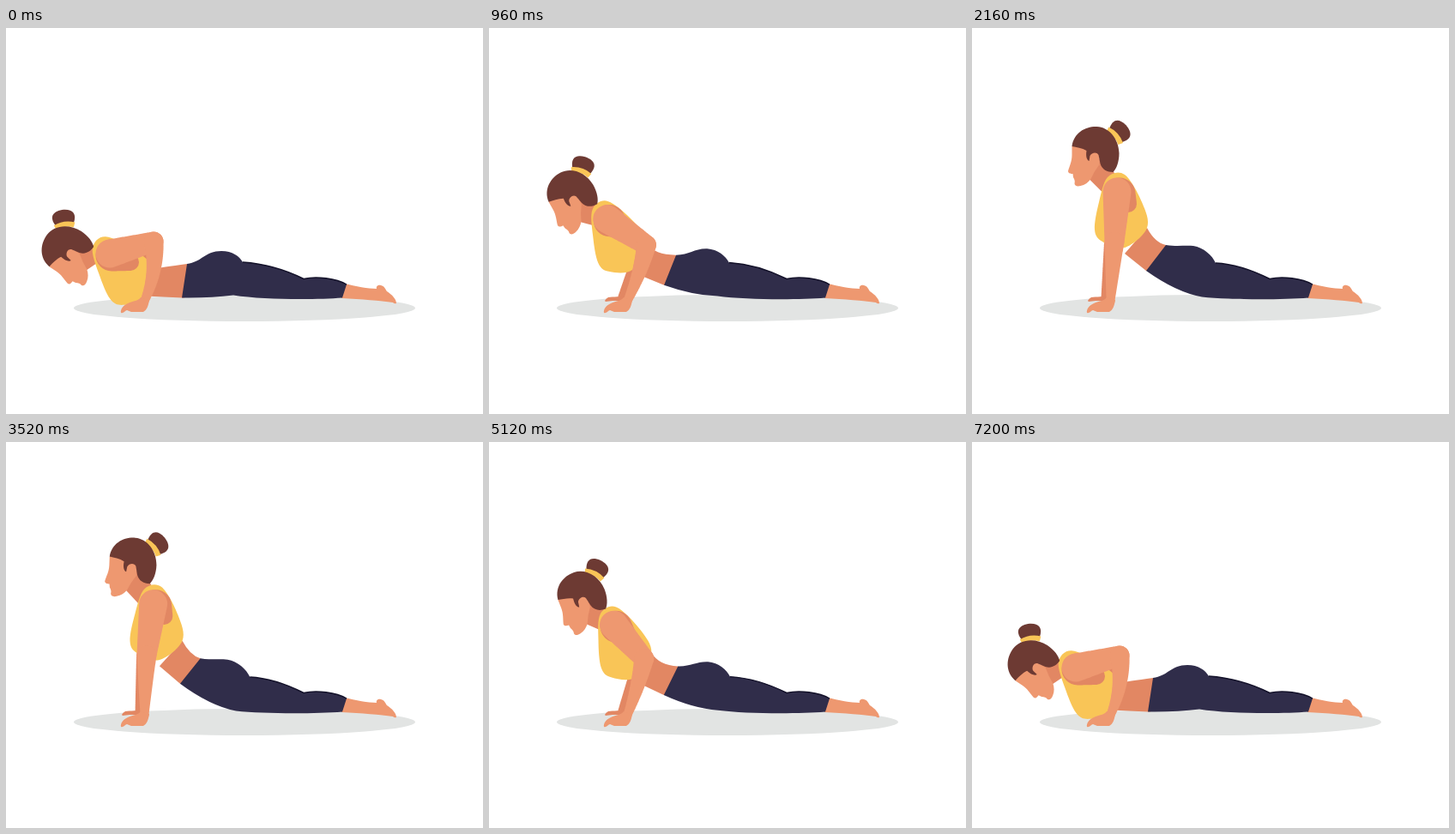
Animation, 556 px wide and 450 px high, one loop 7.24 s. Source, as an HTML page with a canvas:

```html
<!DOCTYPE html>
<html lang="en">
<head>
<meta charset="utf-8">
<title>Cobra stretch</title>
<style>
  html, body { margin: 0; width: 100%; height: 100%; overflow: hidden; background: #fff; }
  canvas { display: block; width: 556px; height: 450px; }
</style>
</head>
<body>
<canvas id="stage"></canvas>
<script>
const LOOP = 7240, STEP = 40, PEAK = 1.03;
const SKIN = '#ee9870', SHADE = '#e28763', HAIR = '#6d3a33', YELLOW = '#f9c557',
      NAVY = '#302d4a', EDGE = '#131129', FLOOR = '#e2e4e3';

// Outline of the top around the shoulder, upright: strap, chest, bust, hem, back, nape.
const TOP = [[-14, -19], [-24, 10], [-29, 42], [-20, 56], [6, 63], [32, 40], [26, 10], [6, -22]];

// Head parts, upright around (0, 0); the bun sits on its own tilted axis.
const face = new Path2D('M-29 -7L-29 3C-29 11 -32 16 -33.5 22C-33 25 -30 25 -28 25L-27.5 29Q-25 33 -26 36C-26 39 -23 40 -19 39C-14 38 -10 35 -7 31L-3 23L3 14V-5L-16 -15Z');
const hair = new Path2D('M-29 -7C-27 -23 -13 -30.5 0 -30C14 -29.5 25.5 -16 26 1C26 11 23 19 19 23C12 23 6 20 4 13L2 3C0 -1 -6 0 -8 4L-9 10C-12 9 -13 4 -12 -2C-17 -5 -24 -6 -29 -7Z');
const bun = new Path2D('M-10 -29C-16 -40 -12 -46 0 -46.5C12 -46 17 -40 11 -29Z');
const foot = new Path2D('M394 298C408 301 422 304 432 304C431 301 434 299 437 300C441 301 442 304 444 307C450 311 455 316 455 321Q453 322 451 320C436 318 415 316 391 315Z');
const nearHand = new Path2D('M157 314C155 318 148 318 142 321C137 323 133 328 134 332C137 333 138 330 141 329L146 331H160C164 329 166 324 167 317Z');
const farHand = new Path2D('M159 311C154 314 145 313 139 314C136 316 134 318 136 319L144 318H158Z');

const canvas = document.getElementById('stage');
const ctx = canvas.getContext('2d');
const ratio = window.devicePixelRatio || 1;
canvas.width = 556 * ratio;
canvas.height = 450 * ratio;

const rad = deg => deg * Math.PI / 180;
const mix = (a, b, k) => a + (b - a) * k;
const mixPt = (a, b, k) => [mix(a[0], b[0], k), mix(a[1], b[1], k)];
const progress = (t, from, length) => Math.min(1, Math.max(0, (t - from) / length));
const wave = k => (1 - Math.cos(Math.PI * k)) / 2;

// 0 lies on the mat, 1 is raised; a small extra stretch follows before sinking.
function liftAt(t) {
  const rise = 1 - Math.pow(1 - progress(t, 0, 2160), 1.4);
  const stretch = (PEAK - 1) * wave(progress(t, 2340, 900));
  return (rise + stretch) * (1 - wave(progress(t, 3960, 2980)));
}

// Maps points given around a pivot into the stage.
function frame(pivot, angle) {
  const c = Math.cos(angle), s = Math.sin(angle);
  return ([x, y]) => [pivot[0] + x * c - y * s, pivot[1] + x * s + y * c];
}

function fill(color, path) {
  ctx.fillStyle = color;
  path ? ctx.fill(path) : ctx.fill();
}

function polygon(color, pts) {
  ctx.beginPath();
  pts.forEach(p => ctx.lineTo(...p));
  fill(color);
}

// Tapered round limb, optionally bowed sideways.
function limb(color, a, ra, b, rb, bow = 0) {
  ctx.beginPath();
  for (let i = 0; i <= 40; i++) {
    const k = i / 40, r = mix(ra, rb, k);
    const [x, y] = mixPt(a, b, k), bx = x + 2 * bow * k * (1 - k);
    ctx.moveTo(bx + r, y);
    ctx.arc(bx, y, r, 0, 7);
  }
  fill(color);
}

// Smooth closed outline through the points.
function blob(color, pts) {
  const n = pts.length, at = i => pts[(i + n) % n];
  ctx.beginPath();
  ctx.moveTo(...pts[0]);
  for (let i = 0; i < n; i++) {
    const [p, a, b, q] = [at(i - 1), at(i), at(i + 1), at(i + 2)];
    ctx.bezierCurveTo(a[0] + (b[0] - p[0]) / 6, a[1] + (b[1] - p[1]) / 6,
                      b[0] - (q[0] - a[0]) / 6, b[1] - (q[1] - a[1]) / 6, ...b);
  }
  fill(color);
}

function drawPants(bend, waistTop, waistLow) {
  const p = (x0, y0, x1, y1) => mixPt([x0, y0], [x1, y1], bend);
  const seat = p(276, 273, 284, 274);
  const legTop = () => {
    ctx.bezierCurveTo(305, 275, 328, 283, 347, 292.5);
    ctx.bezierCurveTo(362, 289, 385, 292, 397, 299);
  };
  ctx.beginPath();
  ctx.moveTo(...waistTop);
  ctx.bezierCurveTo(...p(228, 273, 240, 255), ...p(232, 260, 248, 253), ...p(251, 260, 258, 254));
  ctx.bezierCurveTo(...p(264, 260, 270, 256), ...p(272, 266, 280, 265), ...seat);
  legTop();
  ctx.lineTo(392, 314.5);
  ctx.bezierCurveTo(360, 317, 300, 317, ...p(265, 311.5, 268, 313.5));
  ctx.quadraticCurveTo(...p(238, 315, 238, 308), ...waistLow);
  fill(NAVY);
  ctx.beginPath();
  ctx.moveTo(...seat);
  legTop();
  ctx.strokeStyle = EDGE;
  ctx.lineWidth = 1.4;
  ctx.stroke();
}

function drawHead(pivot, angle) {
  ctx.save();
  ctx.translate(...pivot);
  ctx.rotate(angle);
  fill(SKIN, face);
  ctx.save();
  ctx.rotate(rad(47));
  fill(HAIR, bun);
  ctx.beginPath();
  ctx.arc(0, 0, 29.5, rad(-112), rad(-67));
  ctx.strokeStyle = YELLOW;
  ctx.lineWidth = 6;
  ctx.stroke();
  ctx.restore();
  fill(HAIR, hair);
  ctx.restore();
}

function draw(time) {
  const lift = liftAt(time);
  const forward = Math.pow(lift, 1.8), bend = Math.pow(lift, 1.3);
  const arch = 4 * lift * (1 - lift);
  const head = [mix(72.5, 145.5, forward), mix(258, 145, lift)];
  const headTurn = rad(-56 * (1 - bend));
  const shoulder = [mix(123, 172, forward), mix(265, 193, lift)];
  const elbow = [172 - 6 * lift + 15 * arch, 249 + 4 * arch];
  const waistTop = mixPt([211, 275], [226, 253], bend);
  const waistLow = mixPt([205, 314.5], [203, 283], bend);
  const onHead = frame(head, headTurn);
  const top = TOP.map(frame(shoulder, rad(-33 * (1 - Math.pow(lift, 1.6)))));
  const [strap, chest, , , hem, back, , nape] = top;

  ctx.setTransform(ratio, 0, 0, ratio, 0, 0);
  ctx.fillStyle = '#fff';
  ctx.fillRect(0, 0, 556, 450);
  ctx.beginPath();
  ctx.ellipse(278, 326.5, 199, 15.5, 0, 0, 7);
  fill(FLOOR);

  limb(SHADE, [elbow[0] - 4, elbow[1]], 8, [155, 313], 4.5);
  fill(SHADE, farHand);

  // Bare waist
  ctx.beginPath();
  ctx.moveTo(...back);
  ctx.quadraticCurveTo(back[0] + 9, waistTop[1] + 4 - 7 * lift, ...waistTop);
  ctx.lineTo(waistTop[0] + 3, waistTop[1] + 3);
  ctx.lineTo(waistLow[0] + 3, waistLow[1]);
  ctx.lineTo(...waistLow);
  ctx.lineTo(hem[0], hem[1] - 2 + 9 * lift);
  fill(SHADE);

  // Neck
  polygon(SHADE, [onHead([-9, 31]), mixPt(strap, chest, .6), shoulder,
                  mixPt(strap, nape, .5), onHead([18, 20]), onHead([0, 5])]);

  blob(YELLOW, top);
  fill(SKIN, foot);
  drawPants(bend, waistTop, waistLow);

  // Near arm
  limb(SHADE, shoulder, 18.5, [shoulder[0] + 22 - 12 * lift, shoulder[1] + 8 + 4 * lift], 10);
  limb(SKIN, [shoulder[0] - 2 - lift, shoulder[1] - 2], 16.5, elbow, 11.5);
  limb(SKIN, elbow, 11.5, [161.5, 318], 5, 10 * (1 - lift));
  fill(SKIN, nearHand);

  drawHead(head, headTurn);
}

const start = performance.now();
function tick() {
  const time = (performance.now() - start) % LOOP;
  draw(Math.floor(time / STEP) * STEP);
  requestAnimationFrame(tick);
}
tick();
</script>
</body>
</html>
```
